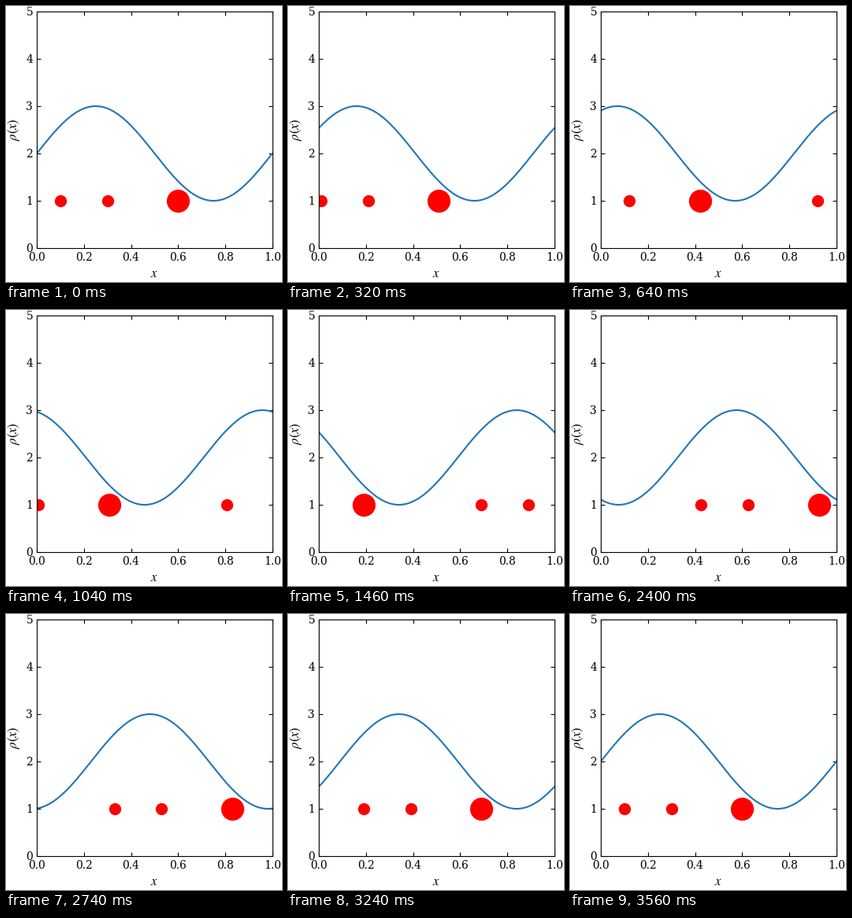
A matplotlib script that plays this animation: 350 px wide and 350 px high, repeating every 3.58 s.

```python
import numpy as np
import matplotlib.pyplot as plt
from matplotlib.animation import FuncAnimation

SIZE, DPI = 350, 100
FRAMES, INTERVAL = 179, 20
LEFT, RIGHT, TOP, BOTTOM = 39.05, 337.8, 7.0, 307.0  # axes edges in pixels

plt.rcParams.update({
    "font.family": "DejaVu Serif",
    "font.size": 10,
    "axes.labelsize": 12,
    "mathtext.fontset": "stix",
    "xtick.direction": "in",
    "ytick.direction": "in",
    "xtick.top": True,
    "ytick.right": True,
})

fig = plt.figure(figsize=(SIZE / DPI, SIZE / DPI), dpi=DPI)
ax = fig.add_axes([LEFT / SIZE, 1 - BOTTOM / SIZE,
                   (RIGHT - LEFT) / SIZE, (BOTTOM - TOP) / SIZE])
ax.set_xlim(0, 1)
ax.set_ylim(0, 5)
ax.set_xlabel(r"$x$")
ax.set_ylabel(r"$\rho(x)$")

x = np.linspace(0, 1, 201)
small_start = np.array([0.1, 0.3])
large_start = np.array([0.6])

wave, = ax.plot([], [], color="C0", lw=1.5)
small, = ax.plot([], [], "ro", ms=10)
large, = ax.plot([], [], "ro", ms=20)


def draw(frame):
    """Shift everything left by one period over the loop."""
    shift = frame / (FRAMES - 1)
    wave.set_data(x, 2 + np.sin(2 * np.pi * (x + shift)))
    for dots, start in ((small, small_start), (large, large_start)):
        dots.set_data((start - shift) % 1, np.ones_like(start))
    return wave, small, large


anim = FuncAnimation(fig, draw, frames=FRAMES, interval=INTERVAL,
                     repeat=True, repeat_delay=0, blit=False)
plt.show()
```
